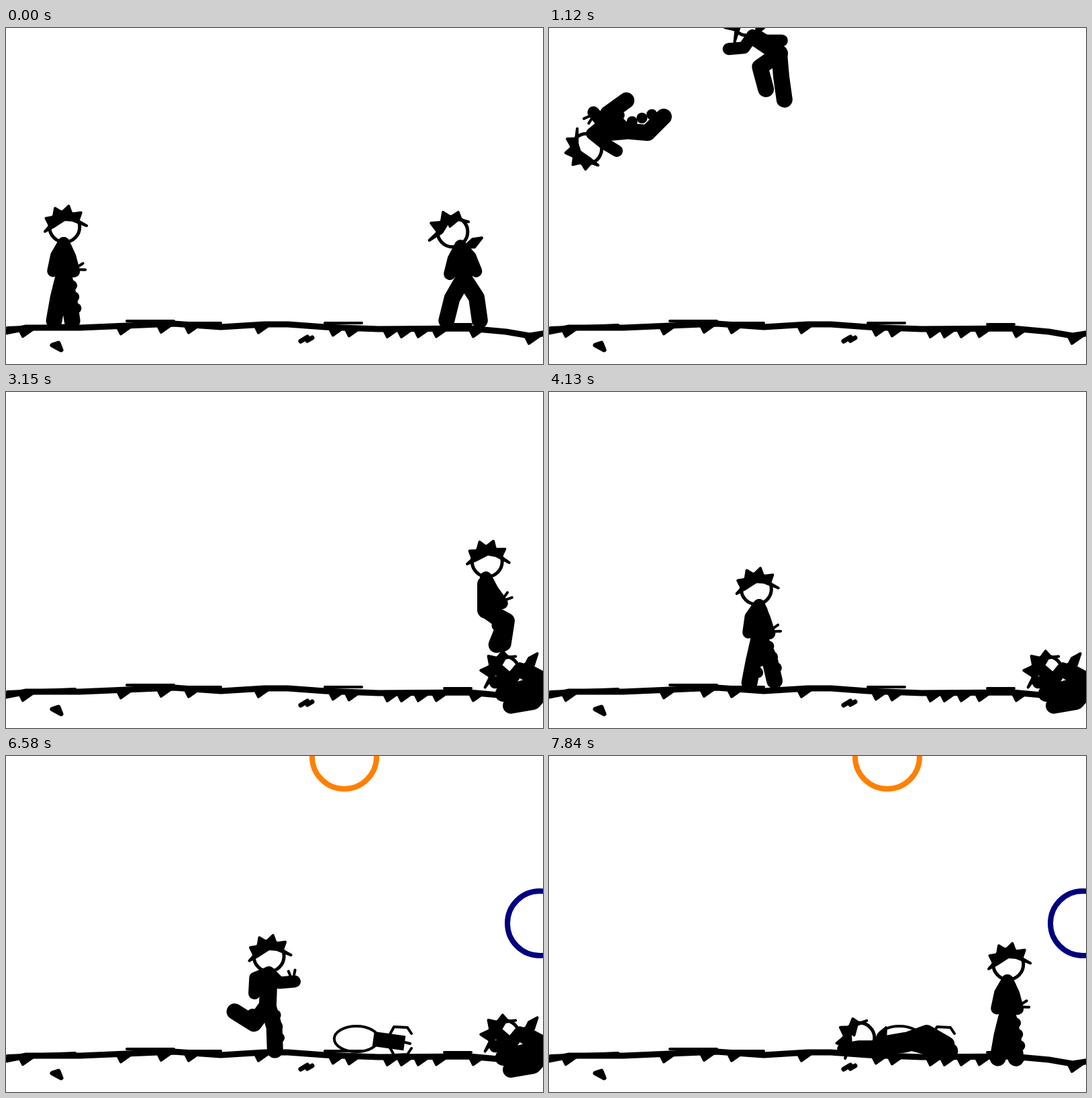
Animation, 800 px wide and 500 px high, one loop 7910 ms. Source, as an HTML page with a canvas:

```html
<!DOCTYPE html>
<html lang="en">
<head>
<meta charset="utf-8">
<title>Stick fight</title>
<style>
html, body { margin: 0; width: 100%; height: 100%; overflow: hidden; background: #fff; }
canvas { display: block; }
</style>
</head>
<body>
<canvas id="stage" width="800" height="500"></canvas>
<script>
const c = document.getElementById('stage').getContext('2d');
const LOOP = 7910, STEP = 70, RAD = Math.PI / 180;
const ORANGE = '#ff8000', NAVY = '#000080';
const BONE = { torso: 48, neck: 24, arm: 22, hand: 23, thigh: 35, shin: 34 };

// Joint angles in degrees. Spine and head: 0 is up. Limbs: 0 is down, positive to the right.
const pose = (lean, head, tilt, arms, legs) => [lean, head, tilt, ...arms, ...legs];

const walkLegs = [-13, -11, 26, 13], crouch = [-20, -70, 35, -30];
const stand = pose(0, 3, 0, [-30, -12, 25, 15], [-14, -10, 13, 8]);
const walk = pose(0, -10, 0, [-35, -8, 22, 18], walkLegs);
const aim = pose(-9, -50, -15, [58, 186, 60, 178], walkLegs);
const step = pose(2, 0, 0, [-68, -3, 45, 95], [-36, -122, 16, 2]);
const kick = pose(-18, -25, -15, [-40, -10, 25, 40], [-5, 0, 90, 95]);
const tuck = pose(0, 5, 10, [30, 45, 30, 50], [100, -30, 95, -20]);
const flip = pose(-95, -160, -112, [51, 59, 130, 220], [-136, 126, 85, 135]);
const pummel = pose(85, 80, 72, [40, 40, 20, 30], crouch);
const punch = pose(60, 50, 50, [40, 40, 150, 120], crouch);

const foe = pose(-6, -29, 0, [-28, -14, 42, 22], [-30, -14, 33, 8]);
const foeRun = pose(-10, -20, 0, [-50, -60, 30, 40], [-30, -10, 30, 70]);
const tossed = pose(-56, -20, -40, [-35, -85, 70, 90], [-55, 15, 5, 8]);
const pile = pose(-62, -100, -20, [-38, -130, -40, -80], [-80, -75, -40, -80]);
const lying = pose(-100, -58, -35, [-90, -80, 80, 100], [75, 80, 110, 60]);

// Alternates two poses every 140 ms while moving along the ground.
function stride(t0, t1, x0, x1, y, poses) {
  const n = Math.round((t1 - t0) / 140);
  return Array.from({ length: n + 1 }, (_, i) =>
    [t0 + (t1 - t0) * i / n, x0 + (x1 - x0) * i / n, y, poses[i % 2]]);
}

// Key: time, hip x, hip y, pose, height of the arc and spin made on the way here
const hero = [
  [0, 86, 368, stand], [490, 80, 368, stand], [700, 105, 350, kick], [1120, 112, 153, flip],
  [1610, 680, 370, kick, 120],
  ...stride(1820, 2380, 706, 706, 392, [pummel, punch]),
  [2450, 690, 368, stand], [2590, 690, 368, stand], [3010, 735, 375, tuck, 270],
  [3360, 685, 368, stand, 50], [3850, 185, 368, step, 170, -360],
  ...stride(3850, 4130, 185, 313, 365, [walk, step]),
  [4480, 311, 362, aim], [6230, 311, 362, aim],
  ...stride(6580, 7000, 390, 680, 370, [step, walk]),
  [7210, 683, 382, stand]
];
const rival = [
  ...stride(0, 560, 682, 190, 372, [foe, foeRun]),
  [1120, 343, 38, tossed], [1610, 770, 430, pile, 30], [1680, 808, 434, pile], [6860, 808, 434, pile],
  [7070, 900, 250, tossed], [7071, 530, 20, tossed], [7350, 530, 424, lying]
];
// Key: time, x, y, angle
const gunKeys = [
  [4270, 400, -70, -72], [4690, 375, 280, -12], [5390, 375, 280, -12], [5460, 357, 277, -72],
  [5950, 357, 277, -72], [6230, 400, 300, -10], [6510, 570, 424, 0]
];
const soil = [[-5, 453], [30, 446], [110, 446], [180, 443], [250, 440], [320, 445], [385, 441],
  [420, 441], [475, 445], [555, 448], [690, 447], [745, 452], [780, 458], [805, 454]];
const teeth = [24, 170, 230, 271, 375, 486, 510, 567, 588, 613, 640, 695, 778];

const clamp = v => Math.max(0, Math.min(1, v));
const mix = (a, b, u) => a + (b - a) * u;

function between(keys, t) {
  const i = Math.max(0, keys.findLastIndex(k => k[0] <= t));
  const a = keys[i], b = keys[i + 1] || a;
  return [a, b, b === a ? 0 : clamp((t - a[0]) / (b[0] - a[0]))];
}

function trace(pts) {
  c.beginPath();
  for (let i = 0; i < pts.length; i += 2) c.lineTo(pts[i], pts[i + 1]);
}
function line(width, ...pts) {
  trace(pts);
  c.lineWidth = width;
  c.stroke();
}
function shape(pts, width = 4) {
  trace(pts);
  c.closePath();
  c.fill();
  c.lineWidth = width;
  c.stroke();
}
function ring(x, y, rx, ry, width) {
  c.beginPath();
  c.ellipse(x, y, rx, ry, 0, 0, 7);
  c.lineWidth = width;
  c.stroke();
}
function ink(color) { c.fillStyle = c.strokeStyle = color; }
function at(x, y, deg, draw) {
  c.save();
  c.translate(x, y);
  c.rotate(deg * RAD);
  draw();
  c.restore();
}
const polar = (deg, r) => [r * Math.cos(deg * RAD), r * Math.sin(deg * RAD)];
const reach = ([x, y], deg, len) => [x + len * Math.sin(deg * RAD), y + len * Math.cos(deg * RAD)];

// Spikes around the top of the head, closed by a fringe over the face.
function hair(start, gap, count, first, last, fringe) {
  const pts = [];
  for (let i = 0; i < count; i++) {
    const a = start + gap * i;
    pts.push(...polar(a, mix(first, last, i / (count - 1))));
    if (i < count - 1) pts.push(...polar(a + gap * 0.45, 22));
  }
  shape([...pts, ...fringe]);
}

function limb(width, from, a, lenA, b, lenB) {
  const joint = reach(from, a, lenA), end = reach(joint, b, lenB);
  line(width, ...from, ...joint, ...end);
  return [joint, end];
}

// Folds of the trousers, on one side of the leg.
function folds(hip, foot) {
  const dx = foot[0] - hip[0], dy = foot[1] - hip[1], d = Math.hypot(dx, dy) || 1;
  for (const u of [0.25, 0.5, 0.75]) {
    const x = hip[0] + dx * u + dy / d * 9, y = hip[1] + dy * u - dx / d * 9;
    line(16, x, y, x + 0.1, y);
  }
}

function fighter(keys, t, isHero) {
  const [a, b, u] = between(keys, t);
  const [lean, turn, tilt, a1, a2, b1, b2, l1, l2, r1, r2] = a[3].map((v, i) => mix(v, b[3][i], u));
  const [, x, y, , arc = 0, spin = 0] = b;
  at(mix(a[1], x, u), mix(a[2], y, u) - arc * 4 * u * (1 - u), spin * u, () => {
    const hip = [0, 0], neck = reach(hip, 180 - lean, BONE.torso);
    const head = reach(neck, 180 - turn, BONE.neck);
    ring(...head, 22.5, 22.5, 5);
    at(...head, tilt, () => isHero
      ? hair(167, 38, 6, 30, 33, [12, -10, 0, -11, -17, 0])
      : hair(160, 42, 5, 37, 28, [8, -18, -4, -8, -6, -15, -16, 1]));
    line(26, ...reach(hip, 180 - lean, BONE.torso - 10), 0, 0);
    limb(18, neck, a1, BONE.arm, a2, BONE.hand);
    const hand = limb(18, neck, b1, BONE.arm, b2, BONE.hand)[1];
    for (const [thigh, shin] of [[l1, l2], [r1, r2]]) {
      const foot = limb(24, hip, thigh, BONE.thigh, shin, BONE.shin)[1];
      if (isHero) folds(hip, foot);
    }
    if (isHero) at(...hand, -b2, () => { line(4, 0, -3, 16, -8); line(4, 0, -3, 17, 2); });
    else at(...neck, tilt, () => shape([5, 2, 18, -10, 32, -12, 21, 2]));
  });
}

function ground() {
  line(9, ...soil.flat());
  for (const [x, y, w] of [[2, 442, 101], [180, 436, 70], [250, 439, 70], [475, 439, 55], [653, 441, 40]]) {
    line(4, x, y + (x < 9 ? 4 : 0), x + w, y);
  }
  for (const x of teeth) {
    const [a, b, u] = between(soil, x), y = mix(a[1], b[1], u);
    shape([x - 5, y, x + 18, y, x + 1, y + 12]);
  }
  shape([69, 472, 78, 469, 82, 479], 7);
  line(7, 439, 466, 449, 460);
  line(7, 449, 465, 456, 461);
}

function gunPlace(t) {
  const [a, b, u] = between(gunKeys, t);
  return [1, 2, 3].map(i => mix(a[i], b[i], u));
}

function gun(t) {
  if (t < gunKeys[0][0]) return;
  at(...gunPlace(t), () => {
    at(0, 0, 8, () => c.fillRect(-23, -11, 47, 22));
    ring(-48, -3, 33, 19, 4);
    for (const side of [-1, 1]) line(4, 2, 10 * side, 8, 21 * side, 28, 20 * side, 34, 11 * side);
    line(4, 20, 1, 32, 4);
  });
}

// A ragged blade of fire with a forked guard, pointing along x.
function blast() {
  let seed = 7;
  const rand = () => (seed = seed * 16807 % 2147483647) / 2147483647;
  for (const side of [-1, 1]) {
    const edge = [0, 0];
    for (let i = 0; i < 16; i++) {
      const d = i * 14, half = 23 * Math.pow(1 - d / 225, 0.7) * Math.min(1, 0.45 + d / 120);
      edge.push(d, half * side, d + 14 * rand(), (half + 9 * rand()) * side);
    }
    shape([...edge, 223, 0], 2);
    shape([8, 6 * side, 20, 30 * side, 6, 50 * side, 24, 41 * side, 34, 50 * side, 36, 25 * side, 42, 8 * side], 2);
  }
}

function shot(t, color, start, fire, hit, px, py) {
  if (t < start) return;
  ink(color);
  if (t < hit) {
    const [x, y, deg] = gunPlace(t);
    const size = clamp((t - start + STEP) / 140), fly = clamp((t - fire) / (hit - fire));
    at(mix(x, px, fly), mix(y, py, fly), deg + 8, () => {
      c.translate(22, -2);
      c.scale(size, size);
      blast();
    });
  } else {
    const r = 48 * clamp((t - hit + STEP) / 140);
    ring(px, py, r, r, 8);
  }
}

function frame(now) {
  const t = Math.floor(now % LOOP / STEP) * STEP;
  c.fillStyle = '#fff';
  c.fillRect(0, 0, 800, 500);
  c.lineCap = c.lineJoin = 'round';
  shot(t, NAVY, 4970, 5040, 5250, 795, 249);
  shot(t, ORANGE, 5460, 5530, 5670, 504, 1);
  ink('#000');
  ground();
  gun(t);
  fighter(rival, t, false);
  fighter(hero, t, true);
}

const begin = performance.now();
function tick() {
  frame(performance.now() - begin);
  requestAnimationFrame(tick);
}
tick();
</script>
</body>
</html>
```
